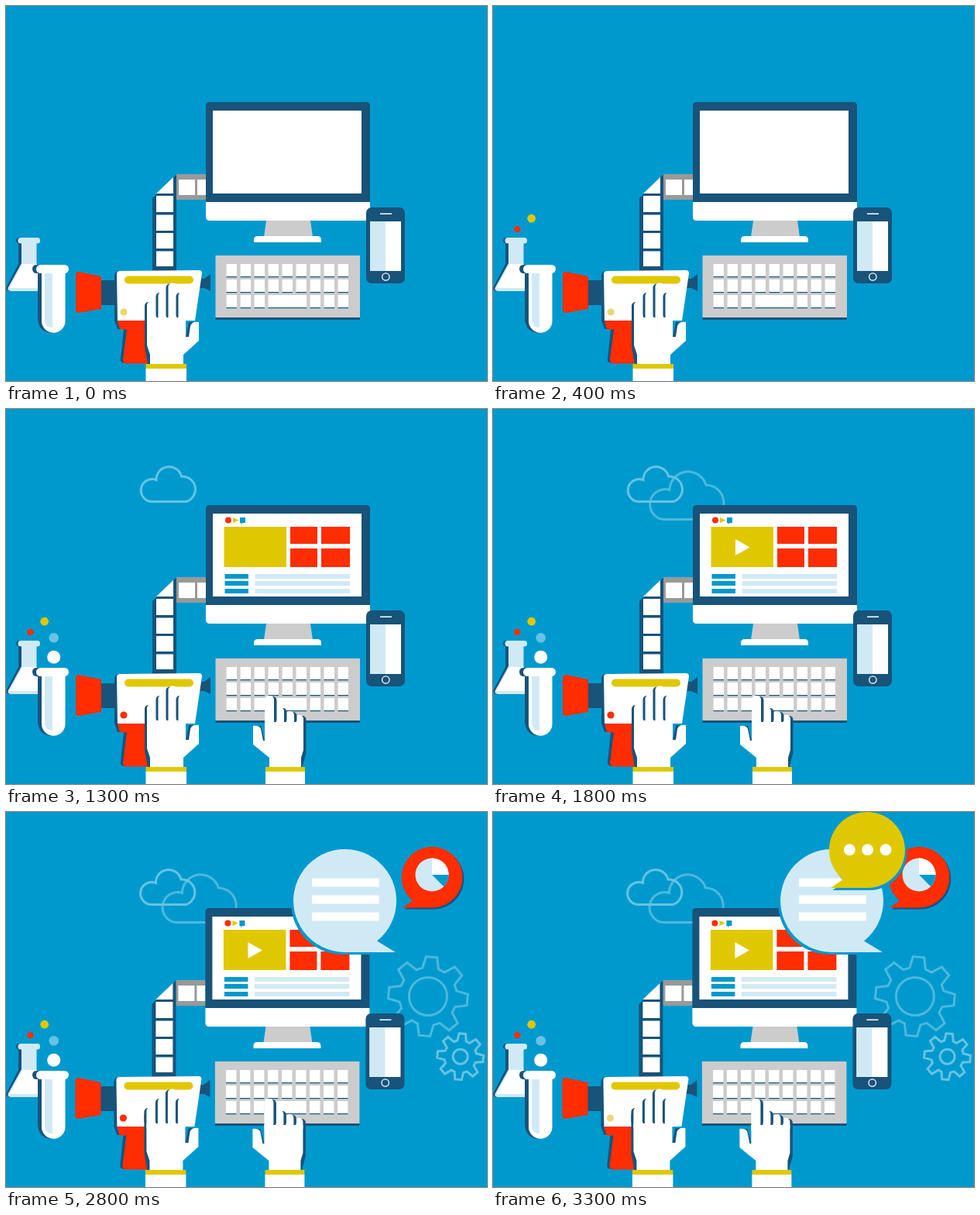
Write an HTML page that moves like this. It is 621x484 px and loops after 3800 ms.

```html
<!DOCTYPE html>
<html lang="en">
<head>
<meta charset="utf-8">
<title>Digital desk</title>
<style>
  html, body { margin: 0; width: 100%; height: 100%; overflow: hidden; background: #0099ce; }
  svg { display: block; width: 621px; height: 484px; }
  .navy { fill: #18537a; }
  .white { fill: #fff; }
  .pale { fill: #d0eaf5; }
  .grey { fill: #ccc; }
  .red { fill: #ff2d00; }
  .yellow { fill: #e0c800; }
  .blue { fill: #0099ce; }
  .line { fill: none; stroke: #4db8dd; stroke-width: 3; }
  .line.soft { stroke: #66c3e2; }
</style>
</head>
<body>
<svg viewBox="0 0 621 484">
  <g id="desk">
    <g class="line">
      <path data-at="1800" d="M283 142.500H220A19.500 19.500 0 1 1 228 104.500A24 24 0 0 1 275 98A23 23 0 0 1 283 142.500Z"/>
      <path data-at="1300" class="line soft" d="M233 119.500H189A14.500 14.500 0 1 1 194 91.500A16.500 16.500 0 0 1 226.500 87A16.700 16.700 0 0 1 233 119.500Z"/>
    </g>
    <g id="bigGear" class="line" data-at="2300"></g>
    <g id="smallGear" class="line soft" data-at="2800"></g>

    <!-- film strip -->
    <path fill="#999" d="M220 217h38v33h-38z"/>
    <path class="white" d="M223 224h21v20h-21zM247 224h11v20h-11z"/>
    <path class="navy" d="M189 248L220 217.500V342H189z"/>
    <path class="white" d="M194 242L216 221V242zM194 245h22v21h-22zM194 269.500h22v20.500h-22zM194 293h22v20h-22zM194 316.500h22v19.500h-22z"/>

    <!-- monitor -->
    <path class="grey" d="M336 277h57l3 21h-63z"/>
    <path class="white" d="M320 305v-3q0-5 5-5h77q5 0 5 5v3z"/>
    <path class="navy" d="M258 253V129q0-5 5-5h202q5 0 5 5V253z"/>
    <path class="white" d="M267 135h192v107H267zM258 253h212v19q0 5-5 5H263q-5 0-5-5z"/>
    <g data-at="1300">
      <circle class="red" cx="287" cy="143.500" r="4"/>
      <path class="yellow" d="M293 140l7.500 3.500-7.500 3.500zM281.500 152h80.500v52h-80.500z"/>
      <path class="blue" d="M302 140h7v7h-3.500l-2 2v-2H302zM282.500 213h30.500v6h-30.500zM282.500 222h30.500v6h-30.500zM282.500 232h30.500v6h-30.500z"/>
      <path class="red" d="M367 152h35v22h-35zM407 152h37v22h-37zM367 180h35v24h-35zM407 180h37v24h-37z"/>
      <path class="pale" d="M321.500 213H444v6H321.500zM321.500 222H444v6H321.500zM321.500 232H444v6H321.500z"/>
    </g>
    <path class="white" data-at="1800" d="M313 168l18.500 10.500-18.500 10.500z"/>

    <!-- keyboard -->
    <path class="grey" d="M270.500 322H457v80H270.500z"/>
    <path class="navy" d="M270.500 402H457v3H270.500z"/>
    <g id="keys"></g>

    <!-- phone -->
    <rect class="navy" x="465" y="260" width="50" height="98" rx="7"/>
    <path class="white" d="M470 278h40v64h-40zM483 267.500h15v1.500h-15z"/>
    <path class="pale" d="M470 278h20v64h-20z"/>
    <circle cx="490.300" cy="349.500" r="4.700" fill="none" stroke="#fff" stroke-width="1.300"/>

    <!-- camera -->
    <path class="navy" d="M122 354h21v32h-21zM249 352h7l8-6v22l-8-4h-7zM140 406V349q0-7 7-7h20v64zM140 406h20v55h-8q-5-1-4-6l4-38h-8z"/>
    <path class="red" d="M90 347q0-4 4-4l29 6v42l-29 5q-4 0-4-4zM144 406h40v55.500h-29q-4 0-4-5l5-39h-9z"/>
    <path class="white" d="M143 345q1-3 4-3l102-1q4 0 4 4l-9 61H144z"/>
    <rect class="yellow" x="153" y="348.500" width="89" height="10" rx="5"/>
    <circle id="lamp" cx="152" cy="395" r="4.600"/>

    <!-- left hand -->
    <path class="navy" d="M179 390h8v72h-4l-4-22zM232 428l4-20h6l-2 24z"/>
    <g id="leftFingers"></g>
    <path class="white" d="M182 402h50v25h4l2-14q2-6 11-5v24l-20 18v13h-43v-13l-4-12zM180.500 468H233v16h-52.500z"/>
    <path class="yellow" d="M180.500 462H233v6h-52.500z"/>

    <!-- right hand -->
    <g data-at="1300">
      <path class="navy" d="M380 402h7.500v42l-5 18H378zM334 428l-5-19h-4l3 22z"/>
      <g id="rightFingers"></g>
      <path class="white" d="M384 404h-50v24h-2l-3-15q-2-5-10-4v24l21 17v13h41v-13l3-10zM335 468h51v16h-51z"/>
      <path class="yellow" d="M335 462h51v6h-51z"/>
    </g>
  </g>

  <!-- flask and test tube -->
  <path class="navy" d="M15 299h10v69H4q-5-1-3-6l15-29v-27h-1q-4-3 0-7z"/>
  <path class="pale" d="M20 304h19.500v29L59 368H6q-5-1-3-5l17-31z"/>
  <rect class="pale" x="15.500" y="299" width="28.500" height="7.500" rx="3.500"/>
  <path class="white" d="M21.500 333h18L56 364H4.500z"/>
  <path class="navy" d="M39.500 334H60v88q-19-1-19-20V345h-1.500q-5 0-5.500-5.500 0-5.500 5.500-5.500z"/>
  <path class="white" d="M46 340h30.500v66.500a15.250 15.250 0 0 1-30.500 0z"/>
  <path class="pale" d="M50 344h10v71q-10 0-10-10z"/>
  <rect class="white" x="39" y="334" width="42" height="11" rx="5.500"/>
  <circle class="red" data-at="200" cx="31.300" cy="288" r="4.200"/>
  <circle class="yellow" data-at="400" cx="49.700" cy="274.200" r="5.400"/>
  <circle fill="#66c3e2" data-at="600" cx="61.700" cy="295.300" r="6.300"/>
  <circle class="white" data-at="800" cx="61.700" cy="320.300" r="8.500"/>

  <!-- speech bubbles -->
  <g data-at="2300">
    <path id="chat" class="blue" transform="translate(-3 3)" d="M438 181A66.500 66.500 0 1 1 479 166.500L503 181z"/>
    <use href="#chat" x="3" y="-3" style="display:none"/>
    <path class="pale" d="M438 181A66.500 66.500 0 1 1 479 166.500L503 181z"/>
    <path class="white" d="M395 85.500h86.500v11H395zM395 107.500h86.500v11H395zM395 129.500h86.500v11H395z"/>
  </g>
  <g data-at="2800">
    <path class="navy" transform="translate(2.500 2.500)" d="M549.500 123A39.300 39.300 0 1 0 525 114.500L512 123z"/>
    <path class="red" d="M549.500 123.500A39.300 39.300 0 1 0 525 114.500L512 123.500z"/>
    <circle class="pale" cx="550" cy="81" r="21.500"/>
    <path class="white" d="M550 81V59.500A21.500 21.500 0 0 1 571.500 81z"/>
    <path class="blue" d="M550 81h21.500a21.500 21.500 0 0 1-6.300 15.200z"/>
  </g>
  <g data-at="3300">
    <path class="blue" transform="translate(2.500 3)" d="M483 98A49 49 0 1 0 452 87L436 98z"/>
    <path class="yellow" d="M483 98A49 49 0 1 0 452 87L436 98z"/>
    <g class="white"><circle cx="460.300" cy="48.700" r="7.400"/><circle cx="483.600" cy="48.700" r="7.400"/><circle cx="507" cy="48.700" r="7.400"/></g>
  </g>
</svg>
<script>
const LOOP = 3800;
const byId = id => document.getElementById(id);
const rect = (cls, x, y, w, h, r = 0) =>
  `<rect class="${cls}" x="${x}" y="${y}" width="${w}" height="${h}" rx="${r}"/>`;

function gear(id, cx, cy, hole, root, tip) {
  const points = [];
  for (let i = 0; i < 8; i++) {
    const mid = i * Math.PI / 4 + 0.09;
    for (const [r, a] of [[root, -0.28], [tip, -0.14], [tip, 0.14], [root, 0.28]])
      points.push([cx + r * Math.sin(mid + a), cy - r * Math.cos(mid + a)]);
  }
  byId(id).innerHTML = `<polygon points="${points.join(' ')}"/><circle cx="${cx}" cy="${cy}" r="${hole}"/>`;
}

function fingers(id, shade, bottom, list) {
  byId(id).innerHTML = list.map(([x, top, w]) =>
    rect('navy', x + shade, top + 1, w, bottom - top, 5) +
    rect('white', x, top, w, bottom - top + 8, 5)).join('');
}

function keyboard() {
  const key = (x, y, w) => rect('navy', x, y + 16, w, 1.2) + rect('white', x, y, w, 16);
  let html = '';
  for (let row = 0; row < 3; row++)
    for (let col = 0; col < 9; col++) {
      const space = row === 2 && col === 3;
      html += key(284.6 + col * 18, 333 + row * 20, space ? 49.5 : 13.4);
      if (space) col = 5;
    }
  byId('keys').innerHTML = html;
}

gear('bigGear', 545.5, 238, 24.5, 37.5, 51.5);
gear('smallGear', 587.2, 315.7, 9.5, 21, 30);
fingers('leftFingers', -3, 403, [[182, 381, 11.5], [196.500, 369, 11], [209.500, 357.500, 11.5], [222.500, 369, 9.5]]);
fingers('rightFingers', 3.5, 405, [[373, 395, 11], [361, 390, 11], [348.500, 385, 10.5], [334, 370, 12]]);
keyboard();

const parts = [...document.querySelectorAll('[data-at]')];
const start = performance.now();

function draw(now) {
  const t = Math.max(0, now - start) % LOOP;
  for (const part of parts)
    part.style.visibility = t >= +part.dataset.at ? 'visible' : 'hidden';
  byId('lamp').setAttribute('fill', t >= 800 && t < 3300 ? '#ff2d00' : '#ecd770');
  byId('desk').setAttribute('transform', t >= 2300 ? 'translate(-0.6 0)' : '');
  requestAnimationFrame(draw);
}
draw(start);
</script>
</body>
</html>
```
